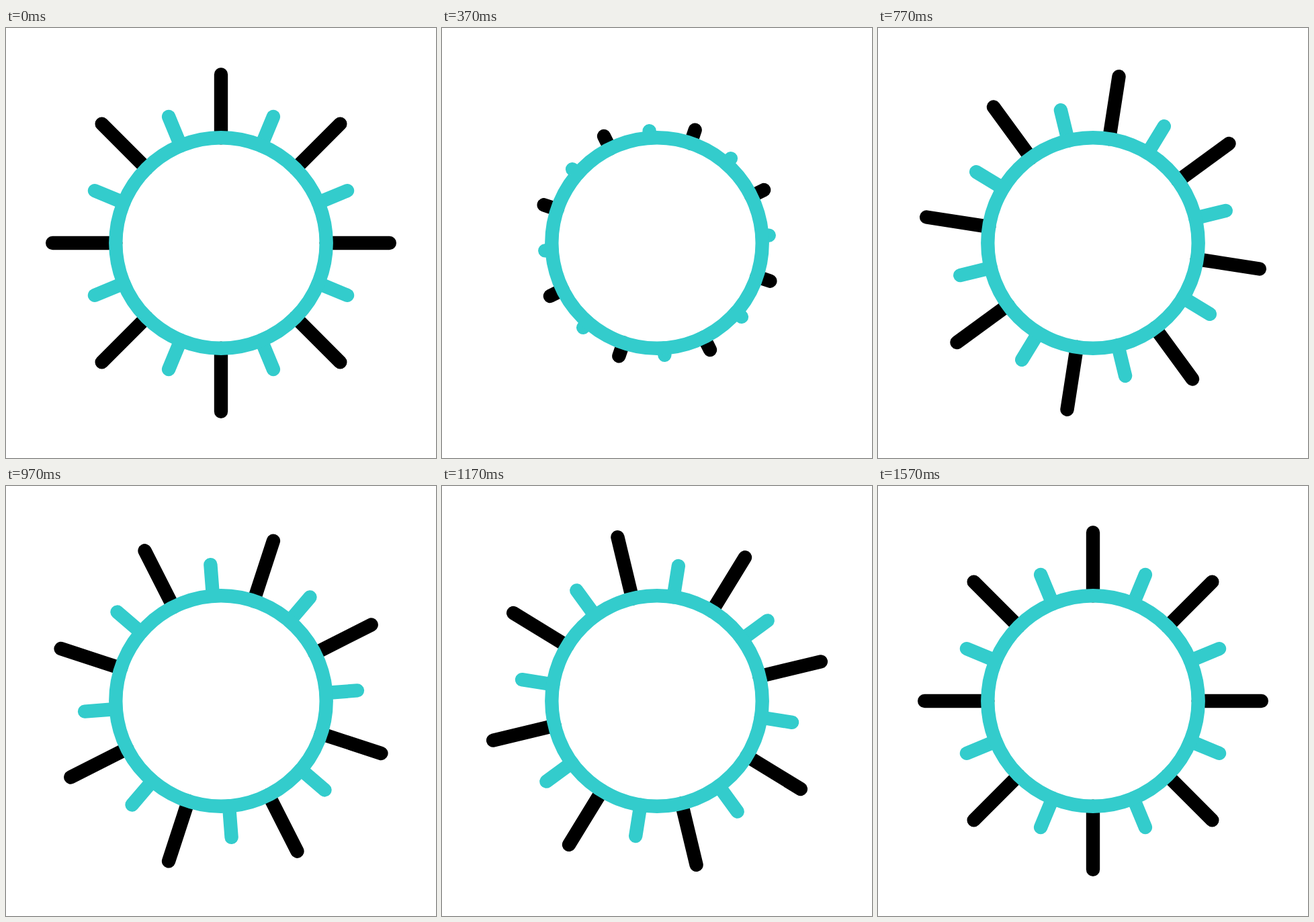
Write an HTML page that moves like this. It is 640x640 px and loops after 1.67 s.

```html
<!DOCTYPE html>
<html lang="en">
<head>
<meta charset="utf-8">
<title>Sun</title>
<style>
  html, body { margin: 0; width: 100%; height: 100%; overflow: hidden; background: #fff; }
  svg { display: block; width: 100vw; height: 100vh; }
</style>
</head>
<body>
<svg viewBox="-320 -320 640 640" fill="none" stroke="#3cc" stroke-width="20.4" stroke-linecap="round">
  <g id="rays">
    <path id="long" stroke="#000"/>
    <path id="short"/>
  </g>
  <circle r="156.7"/>
</svg>
<script>
const LOOP = 1670, FPS = 30;
const RING = 156.7, LONG = 250.8, SHORT = 203.5;
const SWING = 38.5, TURN = 18, END = 46.9; // degrees, then frames
const byId = id => document.getElementById(id);
const clamp = x => Math.min(1, Math.max(0, x));

// Cubic curve (.42, 0, .58, 1), solved by bisection
function ease(x) {
  let lo = 0, hi = 1, s = 0.5;
  for (let i = 0; i < 24; i++) {
    s = (lo + hi) / 2;
    const cx = 1.26 * s * (1 - s) ** 2 + 1.74 * s * s * (1 - s) + s ** 3;
    if (cx < x) lo = s; else hi = s;
  }
  return s * s * (3 - 2 * s);
}

function rayPath(tip, offset, grown) {
  const end = RING + (tip - RING) * grown;
  let d = '';
  for (let i = 0; i < 8; i++) {
    const a = (i * 45 + offset) * Math.PI / 180;
    const at = r => `${(r * Math.cos(a)).toFixed(3)} ${(r * Math.sin(a)).toFixed(3)}`;
    d += `M${at(RING)}L${at(end)}`;
  }
  return d;
}

function draw(now) {
  const frame = Math.floor((now % LOOP + 3.5) * FPS / 1000);
  const swing = frame < TURN
    ? ease(frame / TURN)
    : 1 - ease(clamp((frame - TURN) / (END - TURN)));
  // Rays retract into the ring and grow back during the backward swing
  const grown = clamp(Math.abs(frame / (TURN / 2) - 1));
  byId('rays').setAttribute('transform', `rotate(${-SWING * swing})`);
  byId('long').setAttribute('d', rayPath(LONG, 0, grown));
  byId('short').setAttribute('d', rayPath(SHORT, 22.5, grown));
}

const start = performance.now();
function tick() {
  draw(performance.now() - start);
  requestAnimationFrame(tick);
}
tick();
</script>
</body>
</html>
```
